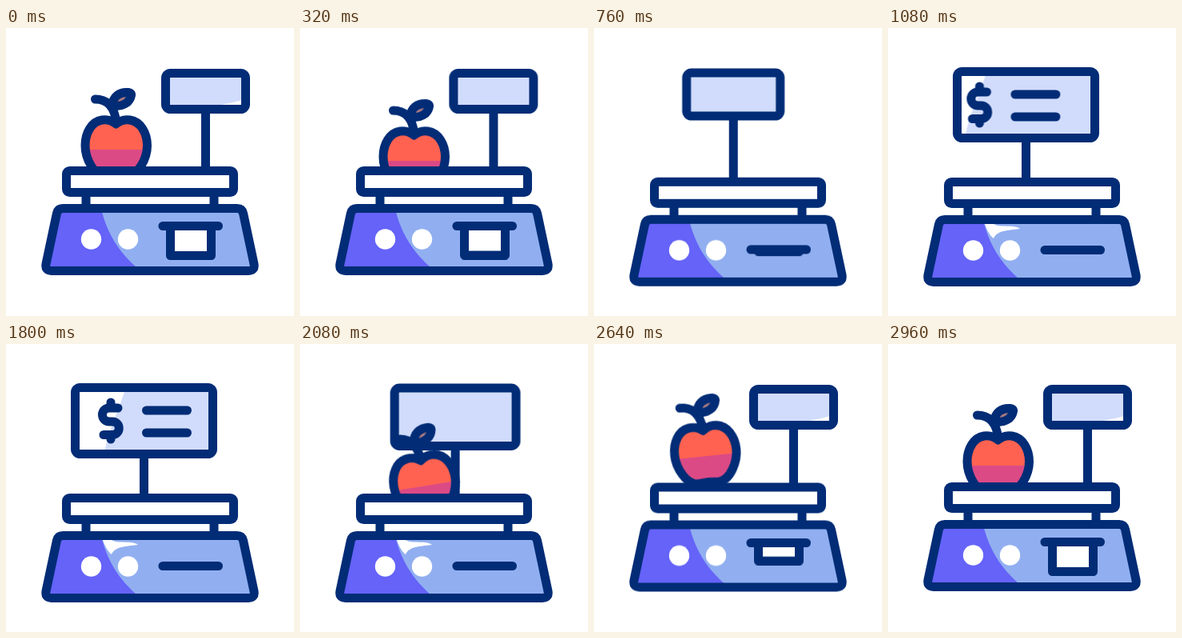
Write an HTML page that moves like this. It is 360 px wide and 360 px high and loops after 3000 ms.

```html
<!DOCTYPE html>
<html lang="en">
<head>
<meta charset="utf-8">
<title>Kitchen scale</title>
<style>
  :root { --navy: #022c76; }
  html, body { margin: 0; width: 100%; height: 100%; overflow: hidden; background: #fff; }
  svg { display: block; width: 100%; height: 100%; }
  .ink { stroke: var(--navy); stroke-width: 11; stroke-linecap: round; stroke-linejoin: round; }
  .none { fill: none; }

  .head, .screen, .text, .apple, .base, .slot, .paper, .glint, .shine {
    animation: 3s cubic-bezier(.455, .03, .515, .955) infinite;
  }
  .head { animation-name: head; }
  .screen { animation-name: screen; }
  .text { animation-name: text; }
  .apple { animation-name: apple; transform-origin: 137.5px 151px; }
  .base { animation-name: base; }
  .slot { animation-name: slot; }
  .paper { animation-name: paper; }
  .glint { animation-name: glint; animation-timing-function: step-end; }
  .shine { animation-name: shine; animation-timing-function: step-end; }

  @keyframes head {
    0%, 6%, 81%, 100% { transform: none; }
    27.47%, 62.67% { transform: translateX(-77px); }
  }
  @keyframes screen {
    0%, 21.33%, 81%, 100% { x: 199.5px; y: 56.5px; width: 100px; height: 45px; }
    33.33%, 62.67% { x: 163.5px; y: 54.5px; width: 172px; height: 83px; }
  }
  @keyframes text {
    0%, 25.33% {
      transform: translateX(calc(-145px * var(--k, 1)));
      animation-timing-function: cubic-bezier(.165, .84, .44, 1);
    }
    49.33%, 60% {
      transform: none;
      animation-timing-function: cubic-bezier(.55, .055, .675, .19);
    }
    69.33%, 100% { transform: translateX(calc(-145px * var(--k, 1))); }
  }
  @keyframes apple {
    0%, 6% { transform: translate(0, 0) rotate(0deg); }
    25.77%, 63.33% {
      transform: translate(42.5px, 121px) rotate(0deg);
      animation-timing-function: cubic-bezier(.25, .46, .45, .94);
    }
    79.33% { transform: translate(4.8px, -29px) rotate(-14.5deg); }
    95.33%, 100% { transform: translate(0, 0) rotate(0deg); }
  }
  @keyframes base {
    0%, 13.83%, 90%, 100% { transform: none; }
    26.33%, 74.67% { transform: translateY(14px); }
  }
  @keyframes slot {
    0%, 16.5%, 90%, 100% { transform: none; }
    26.33%, 74.67% { transform: translateY(16px); }
  }
  @keyframes paper {
    0%, 9.33%, 94.5%, 100% { transform: none; }
    29%, 80% { transform: translateY(-37px); }
  }
  @keyframes glint {
    0%, 86% { opacity: 1; }
    8.6% { opacity: 0; }
  }
  @keyframes shine {
    0%, 74.67% { opacity: 0; }
    26% { opacity: 1; }
  }
</style>
</head>
<body>
<svg viewBox="0 0 360 360">
  <defs>
    <clipPath id="pane"><rect class="screen" rx="6"/></clipPath>
    <clipPath id="above"><path d="M0 0H360V195H0Z"/></clipPath>
    <clipPath id="below"><path d="M190 247H275V300H190Z"/></clipPath>
    <path id="body" d="M137.5 120C133 116 126 114 120 115C107 117 99 131 99 147C99 163 110 185.5 125 185.5C130 185.5 133 184.5 137.5 184.5C142 184.5 145 185.5 150 185.5C165 185.5 176.5 163 176.5 147C176.5 131 168 117 155 115C149 114 142 116 137.5 120Z"/>
    <path id="hull" d="M71 225.5H289Q295 225.5 296.5 231.5L310 295Q311.5 303.5 303 303.5H57Q48.5 303.5 50 295L63.5 231.5Q65 225.5 71 225.5Z"/>
    <clipPath id="flesh"><use href="#body"/></clipPath>
  </defs>

  <g class="head">
    <path class="ink" d="M249.5 80V190"/>
    <rect class="screen" rx="6" fill="#d1dcfc"/>
    <g clip-path="url(#pane)">
      <path class="glint" fill="#fff" d="M262 97Q282 94 295 90V97Z"/>
      <path class="text" style="--k: 1.6" fill="#fff" d="M-140 40H230C224 75 203 105 199 145H-140Z"/>
      <g class="text">
        <path class="ink none" d="M217 80H206a8.5 8.5 0 0 0 0 17h4a8 8 0 0 1 0 16.5H199M208 73V80M208 114V119"/>
        <path class="ink" d="M252.5 83H303.5M252.5 111H303.5"/>
      </g>
    </g>
    <rect class="screen ink none" rx="6"/>
  </g>

  <g clip-path="url(#above)">
    <g class="apple">
      <g clip-path="url(#flesh)">
        <path fill="#ff6250" d="M90 100H190V153H90Z"/>
        <path fill="#dc4a85" d="M90 152H190V195H90Z"/>
      </g>
      <use href="#body" class="ink none"/>
      <path class="ink none" d="M111.5 89C124 89 136 96 137.5 118"/>
      <path class="ink" fill="#a8797f" d="M133 97C133 86 142 79.5 153 80.5Q157 81 156.5 84C155 93 146 99 133 97Z"/>
    </g>
  </g>

  <g class="base">
    <path class="ink" d="M100 206V226M260 206V226"/>
    <rect class="ink" x="75.5" y="178.5" width="209" height="27" rx="4" fill="#fff"/>
    <use href="#hull" fill="#91aff0"/>
    <path fill="#6563f8" d="M66 226H119C125 252 139 280 168 303H52Z"/>
    <path class="shine" fill="#fff" d="M121 231C124 239 127 245 132 249C136 239 150 239 165 237C158 231 140 236 132 231Z"/>
    <use href="#hull" class="ink none"/>
    <g fill="#fff">
      <circle cx="106.5" cy="264" r="12.7"/>
      <circle cx="152.5" cy="264" r="12.7"/>
    </g>
    <g class="slot">
      <g clip-path="url(#below)">
        <rect class="paper ink" x="205.5" y="200" width="51" height="84.5" fill="#fff"/>
      </g>
      <path class="ink" d="M196 247.5H265.5"/>
    </g>
  </g>
</svg>
</body>
</html>
```
